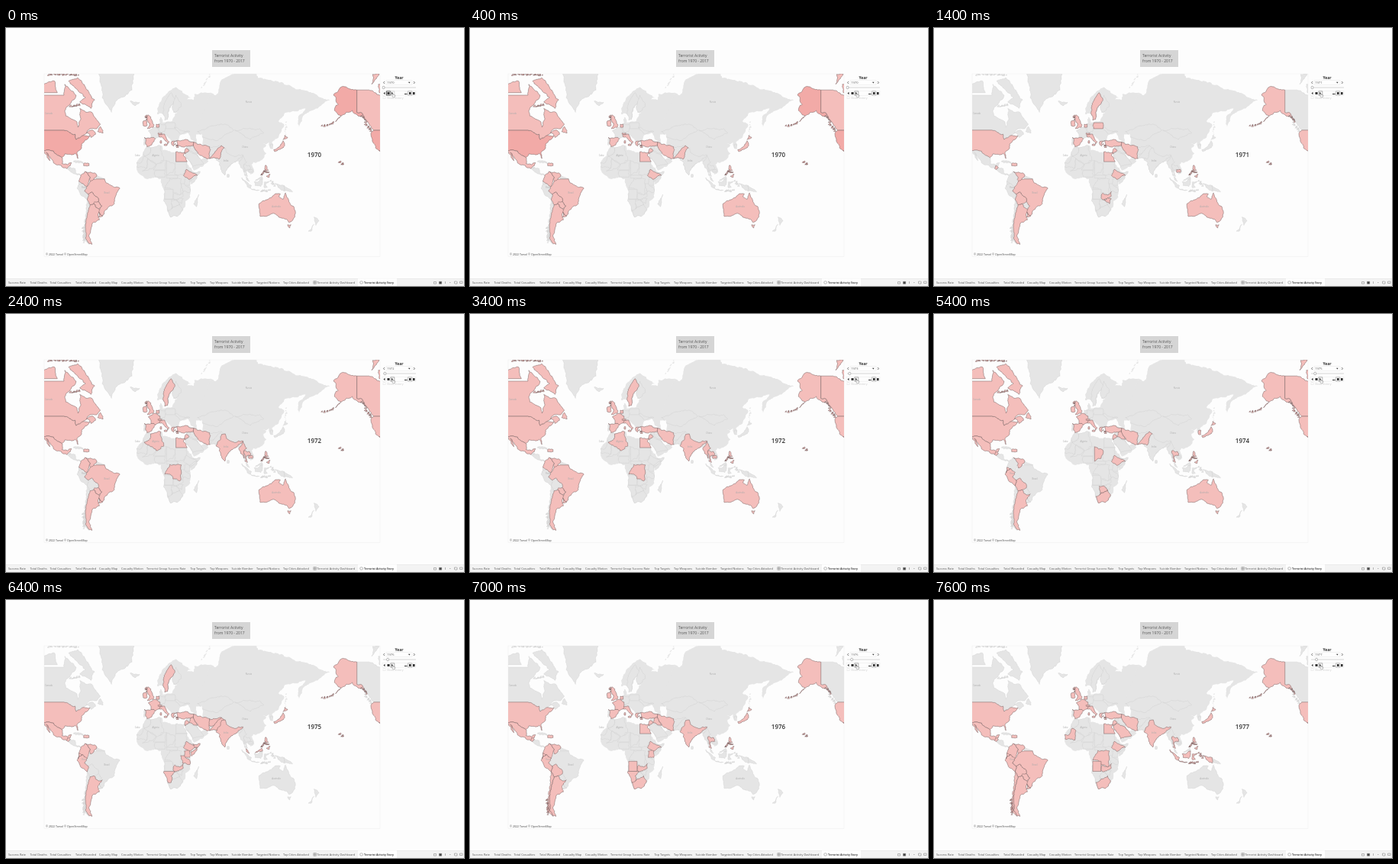
These frames come from a looping animation (600x338 px, 8 s). An HTML page:

```html
<!DOCTYPE html>
<html lang="en">
<head>
<meta charset="utf-8">
<title>Activity map</title>
<style>
  html, body { margin: 0; width: 100%; height: 100%; overflow: hidden; background: #fdfdfd; }
  svg { display: block; width: 100vw; height: 100vh; font-family: "Open Sans", Inter, sans-serif; }
  .base { fill: #e5e5e5; }
  .sea { fill: #fdfdfd; }
  .country { fill: #e5e5e5; stroke: #cdcdcd; stroke-width: .4; stroke-linejoin: round; }
  .on { fill: #f4bebb; stroke: #755f5f; stroke-width: .5; }
  .strong { fill: #f2aaa7; }
  .place { font-size: 2.8px; fill: #aaa; text-anchor: middle; }
  .tab { font-size: 3.85px; fill: #555; }
  .icon { fill: #333; }
  .frame { fill: none; stroke: #888; stroke-width: .5; }
</style>
</head>
<body>
<svg viewBox="0 0 600 338">
  <defs><clipPath id="mapArea"><rect x="50" y="60" width="440" height="240"/></clipPath></defs>
  <rect x="270" y="29" width="50" height="22" fill="#d5d5d5"/>
  <g font-size="5" fill="#555"><text x="273" y="38.2">Terrorist Activity</text><text x="273" y="45">from 1970 - 2017</text></g>

  <rect x="50" y="60" width="440" height="239.5" fill="none" stroke="#f0f0f0" stroke-width=".6"/>
  <g clip-path="url(#mapArea)"><g id="land"></g><g id="places"></g></g>
  <text id="mapYear" x="404" y="168.6" font-size="8" font-weight="600" fill="#333" text-anchor="middle"></text>
  <text x="52" y="298.2" font-size="3.6" fill="#444">© 2022 Tarvol © OpenStreetMap</text>

  <g id="controls">
    <text x="515" y="67" font-size="5" font-weight="700" fill="#333" text-anchor="middle">Year</text>
    <rect x="498" y="68.8" width="34" height="5.4" fill="#fff" stroke="#ddd" stroke-width=".4"/>
    <path d="M496 70l-1.5 1.5 1.5 1.5M534 70l1.5 1.5-1.5 1.5" fill="none" stroke="#444" stroke-width=".7"/>
    <path class="icon" d="M527 70.8h2.6l-1.3 1.6z"/>
    <text id="pickerYear" x="499.3" y="73" font-size="4" fill="#555"></text>
    <path d="M494 78H537" stroke="#bbb" stroke-width=".6"/>
    <rect id="thumb" y="76.3" width="2.6" height="3.4" rx="1" fill="#fff" stroke="#777" stroke-width=".5"/>
    <rect x="493" y="82.6" width="44" height="5.6" fill="none" stroke="#ddd" stroke-width=".3"/>
    <path class="icon" d="M496.5 83.8v3.4l-2-1.7zM499.5 84h3v3h-3zM505 83.8v3.4l2-1.7zM522 86h3.5v1H522z
      M528 84h2.6v3H528zM533 84h2.6v3.2H533z"/>
    <path class="frame" d="M526.5 82.8h5.4v5.3h-5.4z"/>
    <path id="stopFrame" class="frame" style="stroke:#333;stroke-width:.8" d="M498.4 82.8h5.2v5.3h-5.2z"/>
    <path id="playFrame" class="frame" d="M503.8 82.8h5v5.3h-5z"/>
    <path d="M506 85.7v4l1.2 1h2l.8-2.5-2.8-.7v-1.8z" fill="#fff" stroke="#555" stroke-width=".4"/>
    <rect x="494" y="89.8" width="3" height="3" fill="none" stroke="#ddd" stroke-width=".4"/>
    <text x="499" y="92.8" font-size="3.6" fill="#ccc">Show history</text>
  </g>

  <rect y="328.5" width="600" height="9.5" fill="#f3f3f3"/>
  <path d="M0 328.5H600" stroke="#dcdcdc" stroke-width=".5"/>
  <rect x="461" y="328.3" width="51" height="9.7" fill="#fff"/>
  <g id="tabs"></g>
  <g fill="none" stroke="#777" stroke-width=".5">
    <path d="M402.8 331.6h3.6v3.6h-3.6zM404.6 331.6v3.6M402.8 333.4h3.6"/>
    <rect x="463.8" y="331.8" width="3.6" height="3.2" rx="1"/>
    <path d="M560.5 332.5h3v2.6h-3zM575.5 332v3M581 333.5h1.5M587.5 335v-3h3M591 332v3h-3M594.5 332h3.5v2.5h-3.5z"/>
    <path d="M567.5 332.2h3.2v3h-3.2z" fill="#444"/>
  </g>
</svg>
<script>
const DURATION = 8000;
const $ = id => document.getElementById(id);

// Key points as "lon lat" pairs; "/" starts a new part, two points make a box,
// "~" makes a chain of islets. Coast detail is added by roughen().
const bases = [
  `-9 37 -9 43 -1 43 3 51 8 54 8.5 57.5 11 54 21 55 24 59 29 60 22 60 21 63 25 65.5 18 62 16 56 11 59 5 59 5 62 14 68 25 71
   41 67 34 66.5 44 66 45 68.5 62 69 62 45 45 40 41 42 38 47 30 46 28 41 24 41 23 37 19.5 41.5 13 45.6 7 44 3 43 -1 37.5`,
  `45 40 62 69 68 68 73 73 104 77.5 113 74 140 72.5 160 70 190 66 178 62.5 163 59 157 51 156 57 164 62 141 59 135 55 141 53
   135 43.5 128 40 129 36 126 35 125 39.5 118 38.5 122 37 119 35 122 30 117 23.5 108 21.5 106 19 109 12 105 9 100 13 100 7
   98 9 98 16 91 22.5 86 21 80 15 77.5 8 73 16 72 21 67 25 57 26 50 30 48 29.5 52 24 56 26 60 22.5 54 17 44 13 35 28
   36 36.5 27 37 27 40.5 41 41/~53 71 66 76.5/~142 46 143 54`,
  `-6 36 10 37 11 33 20 31 32 31 37 21 43 11.5 51 12 40 -3 40.5 -15 35 -20 35 -25 32 -29 26 -34 19 -34.5 12 -17 13 -9 9 0
   9 4 4.5 6.3 -8 4.4 -13 8.5 -17 14.5 -17 21 -10 30`
];
const countries = {
  US: `-125 48 -123 49 -95 49 -83 46 -82 42 -75 45 -67 45 -70 42 -76 38 -76 35 -81 31 -80 25 -83 30 -94 29.5 -97 26 -103 29
    -106 32 -117 32.5 -121 35 -124 40/-141 60 -141 70 -156 71.3 -166 68 -161 64 -165 61 -158 58 -164 54.5 -151 60 -146 61
    -136 58 -130 55 -137 60/~-166 54 -178 52/~-160 22 -156 19.5/~-136 58 -131 55`,
  CA: `-141 60 -141 70 -128 70 -115 68 -95 68 -94 72 -82 68 -94 61 -93 58 -82 55 -80 51 -77 56 -78 62 -70 60 -65 60 -56 53
    -60 50 -67 50 -71 47 -64 49 -61 46 -66 43.5 -70 47 -75 45 -82 42 -83 46 -95 49 -123 49 -130 55 -137 60
    /-62 66 -80 74 -90 73 -72 67 -78 65 -66 62/-117 69 -102 69 -105 73 -118 72/-125 72 -117 75 -124 75
    /-59 48 -56 51.5 -53 47/~-112 75 -80 75/~-88 63 -78 64/~-132 54 -126 49`,
  MX: "-117 32.5 -106 32 -103 29 -97 26 -97 20 -91 19 -87 21 -88 18 -92 15 -96 16 -105 20 -109 25 -114 31 -110 23 -113 26",
  GT: "-92 15 -91 18 -88 16 -90 14", PA: "-89 16 -83 15 -82 10 -77 8 -84 9.5 -90 13.5",
  CU: "-85 22 -74 20 -80 23", DO: "-74 20 -68 18",
  CO: "-77 8 -72 12 -67 6 -70 -4 -79 1.5", VE: "-72 12 -62 10.5 -60 7 -64 2 -67 1 -67 6", GY: "-60 8 -51 4 -60 3",
  EC: "-79 1.5 -75 0 -80 -4.5", PE: "-80 -4.5 -75 0 -70 -4 -73 -9 -69 -12 -70 -18 -76 -14 -81 -6",
  BO: "-69 -12 -65 -10 -58 -17 -58 -20 -63 -22 -67 -23 -70 -18",
  BR: "-60 4 -51.5 4 -50 0 -35 -6 -39 -13 -41 -22 -48 -26 -53.5 -33.5 -57.5 -30 -54.5 -24 -58 -20 -58 -17 -65 -10 -69 -12 -73 -9 -70 -4 -67 1",
  PY: "-62 -20 -58 -20 -54.5 -24 -58 -27 -63 -22", UY: "-57.5 -30 -53.5 -33.5 -58 -34.5",
  AR: "-67 -23 -63 -22 -58 -27 -54 -26 -58 -34 -57 -37 -65 -41 -68 -50 -65 -55 -72 -51 -71.5 -40 -70 -33",
  CL: "-70 -18 -67 -23 -70 -33 -71.5 -40 -72 -51 -68 -55 -75 -50 -73 -37/~-74.5 -43 -73 -54",
  GL: "-73 78 -58 75.5 -54 67 -44 60 -40 65 -22 70 -20 78", IS: "-24 65.5 -14 65 -19 63.4",
  IE: "-10 55 -6 52", GB: "-5 58.6 -2 57.5 1.7 52.5 1 51 -5.5 50 -3 53.4 -6 57/~-7 58 -6 56", NL: "4 53 7 51",
  FR: "-1.5 43.5 -4.7 48.4 2.5 51 8 49 7 44 3 42.5", ES: "-9 43.5 -1.5 43.5 3 42.5 -1 37.5 -6 36 -7 42",
  IT: "7 44 7 46 13 46 18 40 16 38 15.5 40 10 44/12.5 38 15.5 37/8.3 41 9.7 39", CH: "6 47 10 46",
  GR: "20 39.5 26 41 23 40 22.5 36.5/~24 38 27 36", SE: "11.5 59 12 63 20 69 24 66 17 61 16 56 13 55.5",
  FI: "21 63 25 68 31 63 24 60", PL: "14 54 24 50", UA: "23 51 40 48 30 46", DE: "6 53 13 48",
  KZ: "48 48 61 51.5 78 53 87 49 69 41 53 44", MN: "88 49 115 50 119 47 105 42",
  TR: "26 41 36 42 44 40 44 37 36 36.5 27 37", IR: "44 40 54 37 61 36 61 31 61.5 25 51 28 46 33",
  IQ: "42 37 44 37 46 33 48 30 39 32.5", AF: "61 36 74 37 70 34 66 30 61 29.5", PK: "63 27 66 30 74 37 77 35 71 24.5 61.5 25",
  IN: "74 34.5 78 35 79 31 88 27 97 28.5 92 25 89 22 80 15 77.5 8 73 16 72 21 68 23.7 70 28", LK: "80 9 82 6",
  IL: "34.3 31 36.5 34.5 39 32.5 35 29.5", SA: "35 29 39 32 46.5 29 52 24 55 20 43 17",
  MM: "92.3 21 97 28 101 21.5 98 19 98 11 94.5 16", TH: "98 19 104 18 105 14 100.5 13.5 101.5 6.5 99 8", KH: "103 14 107 11",
  MY: "100 6.5 104 1.5 101 3/110 2 117 7 118 4",
  ID: `95.5 5.5 106 -3 105 -6/105 -6 114.5 -8 106.5 -7.5/109 1 118 4 116 -4 110 -3/120 1 125 1.5 121 -1 123 -5 120 -5.5
    /131 -1 141 -3 141 -9 138 -8/~117 -8.5 126 -8.5/~127 2 130 -3`,
  PG: "141 -3 150 -10 141 -9", KR: "126.5 38 129 34.5",
  JP: "130 33.5 137 37 140 41 141.5 39 140 35 131 31.5/140 41.8 141.7 45.3 145 43.5",
  PH: "120.5 16 121 18.5 122 18 124 13 120.5 14/122 7 126 9 125 5.7/~120 12.5 125 10.5/~117 8 120 12",
  AU: `114 -22 115.5 -34 124 -33 131 -31.5 137 -35 146 -39 150 -37.5 153 -29 146 -18.5 142.5 -10.7 140 -17.5 135.5 -15 137 -12
    131 -12 122 -18/144.7 -41 148.3 -41 147 -43.6`,
  NZ: "173 -34.5 178.5 -37.7 175 -41.5/173 -40.7 170 -46 167 -46", MG: "49.5 -12.5 47 -25 44 -22",
  EG: "25 31.5 34.5 31 33 28 37 22 25 22", DZ: "-2 35 8.5 37 10 29 12 23.5 4 19 -9 27.3 -2 32", MA: "-6 36 -2 35 -2 32 -9 27.3 -10 31",
  MR: "-17 21 -12 21 -9 27.3 -5 25 -6 15.5 -16.5 16.5", ML: "-5 25 4 19 0 15 -11 12.5 -6 15.5", NE: "4 19 15 23 13.5 13.5 1 13.5",
  TD: "15 23 24 19.5 22 11 15 8", SD: "25 22 37 22 36 14 34 10 24 9", NG: "3 13 13.5 6", CF: "15 8 27 5",
  ET: "36 14 42 11 48 8 39 3.5 33 8", SO: "43 11.5 51 12 42 -1.5 41 3 48 8", KE: "34 4 40 -3", TZ: "30 -1 34 -1 39 -4.7 40 -10.5 32 -9",
  CD: "18.5 4.5 31 4 30 -8.5 29 -13 22 -11 20 -7 13 -6 18 2", AO: "13 -7 22 -17.5", ZM: "22 -16 24 -11 29 -13 33 -9.5 33 -14 24 -18",
  ZW: "25 -18 29 -16 33 -17 31 -22", NA: "12 -17.5 24 -17.5 20 -22 20 -28.5 16.5 -28.5", BW: "20 -18.5 25 -18 29 -22 20.5 -27",
  ZA: "16.5 -28.5 20.5 -27 29 -22 32.5 -27 26 -34 19 -34.5"
};
const caspian = "47 46 53 46 54 37 49 38";

const always = "US IE GB ES IT GR IL AR VE DO ";
const active = {
  1970: "CA MX CO BR BO PY UY NL CH TR IR PK EG ET JP PH AU",
  1971: "GT BR BO UY SE PL NL CH TR IR EG ET ZM ZW KH PH AU",
  1972: "CA MX CO BR PY UY SE FR NL CH TR IR EG DZ CD IN MM TH KH PH AU",
  1973: "MX GT CO EC PE BR PY UY CL FR MA IR AF SD ET CD ZM ZW JP MM MY NZ",
  1974: "CA MX GT PE EC BO FR CH TR IQ IR PK TD ET BW ZA JP KR TH PH AU",
  1975: "MX GT CO PE EC SE FR NL CH TR IQ IR AF PK IN JP MY PH ET SO KE TZ ZM NA",
  1976: "MX GT CO PE EC BO CL FR NL TR IR IQ IN JP TH PH ET KE ZM NA ZA AO EG",
  1977: "MX GT CO PE EC BO BR PY UY CL FR NL CH TR IR SA EG MR IN TH JP PH ID ET CD AO ZM ZA"
};

// The slider moves on at these times; the map follows a little later.
const sliderTimes = [1400, 2400, 3400, 4400, 5400, 6400, 7600];
const mapTimes = [1400, 2400, 3600, 4600, 5600, 6600, 7600];
const yearAt = (times, t) => 1970 + times.filter(start => start <= t).length;

function add(parent, tag, attributes, text = "") {
  const node = document.createElementNS("http://www.w3.org/2000/svg", tag);
  for (const key in attributes) node.setAttribute(key, attributes[key]);
  node.textContent = text;
  return $(parent).appendChild(node);
}

// Web Mercator, 440 px around the globe.
function project([lon, lat]) {
  const scale = 440 / (2 * Math.PI), rad = Math.PI / 180;
  return [192 + 440 * lon / 360, 202.7 - scale * Math.log(Math.tan((45 + lat / 2) * rad))];
}

// Repeatable noise from a position, -0.5 to 0.5.
function noise(x, y) {
  const v = Math.sin(x * 12.9898 + y * 78.233) * 43758.5453;
  return v - Math.floor(v) - .5;
}

// Midpoint displacement depends on position only, so neighbours share their border.
// Long straight borders stay straight.
function roughen(a, b) {
  const dx = b[0] - a[0], dy = b[1] - a[1], length = Math.hypot(dx, dy);
  const straight = length > 10 && (Math.abs(dx) < .01 || Math.abs(dy) < .01);
  if (length < 2.5 || straight) return [b];
  const x = (a[0] + b[0]) / 2, y = (a[1] + b[1]) / 2, size = Math.min(length * .35, 2.6);
  const middle = [x + size * noise(x, y), y + size * noise(y, x)];
  return [...roughen(a, middle), ...roughen(middle, b)];
}

function islets([a, b]) {
  const count = Math.ceil(Math.hypot(b[0] - a[0], b[1] - a[1]) / 2);
  return Array.from({ length: count + 1 }, (_, i) => {
    const x = a[0] + (b[0] - a[0]) * i / count + 2 * noise(i, a[0]);
    const y = a[1] + (b[1] - a[1]) * i / count + 2 * noise(i, a[1]);
    const size = 1.2 + noise(x, y);
    return [[x - size, y + size / 2], [x + size * .6, y - size], [x + size, y + size * .6]];
  });
}

function rings(part) {
  const numbers = part.replace("~", "").trim().split(/\s+/).map(Number);
  let points = [];
  for (let i = 0; i < numbers.length; i += 2) points.push(project(numbers.slice(i, i + 2)));
  if (part.includes("~")) return islets(points);
  if (points.length === 2) {
    const [[x1, y1], [x2, y2]] = points;
    points = [[x1, y1], [x2, y1], [x2, y2], [x1, y2]];
  }
  return [points.flatMap((p, i) => roughen(p, points[(i + 1) % points.length]))];
}

// Every outline is repeated one turn of the globe to the east.
function outlinePath(text) {
  const all = text.split("/").flatMap(rings);
  return [0, 440].flatMap(shift => all.map(ring =>
    "M" + ring.map(([x, y]) => (x + shift).toFixed(1) + " " + y.toFixed(1)).join("L") + "Z")).join("");
}
const addLand = (text, className) => add("land", "path", { d: outlinePath(text), class: className });

bases.forEach(text => addLand(text, "base"));
const shapes = Object.fromEntries(Object.entries(countries).map(([code, text]) => [code, addLand(text, "country")]));
addLand(caspian, "sea");

[["Russia", 318, 98], ["China", 313, 157], ["India", 288, 175], ["Brazil", 132, 217], ["Australia", 354, 235],
 ["Canada", 56, 113], ["Peru", 102, 210], ["Algeria", 196, 168], ["Cabo", 172, 168]]
  .forEach(([name, x, y]) => add("places", "text", { x, y, class: "place" }, name));

[["Success Rate", 3], ["Total Deaths", 31.5], ["Total Casualties", 57.5], ["Total Wounded", 91], ["Casualty Map", 122],
 ["Casualty Motion", 151], ["Terrorist Group Success Rate", 184], ["Top Targets", 241.5], ["Top Weapons", 267],
 ["Suicide Bomber", 295.5], ["Targeted Nations", 328], ["Top Cities Attacked", 363], ["Terrorist Activity Dashboard", 407.5]]
  .forEach(([name, x]) => add("tabs", "text", { x, y: 334.8, class: "tab" }, name));
add("tabs", "text", { x: 469, y: 334.8, class: "tab", style: "fill:#222;font-weight:600;font-size:3.65px" }, "Terrorist Activity Story");

let shownYear;
function showMap(year) {
  if (year === shownYear) return;
  shownYear = year;
  const codes = (always + active[year]).split(" ");
  for (const code in shapes) shapes[code].classList.toggle("on", codes.includes(code));
  shapes.US.classList.toggle("strong", year === 1970);
  codes.forEach(code => $("land").append(shapes[code]));
  $("mapYear").textContent = year;
}

function draw(now) {
  const t = now % DURATION;
  const sliderYear = yearAt(sliderTimes, t);
  showMap(yearAt(mapTimes, t));
  $("pickerYear").textContent = sliderYear;
  $("thumb").setAttribute("x", 493.3 + (sliderYear - 1970) * .93);
  $("stopFrame").style.display = t < 400 ? "" : "none";
  $("playFrame").style.stroke = t < 200 ? "#bbb" : "#666";
  requestAnimationFrame(draw);
}
requestAnimationFrame(draw);
</script>
</body>
</html>
```
